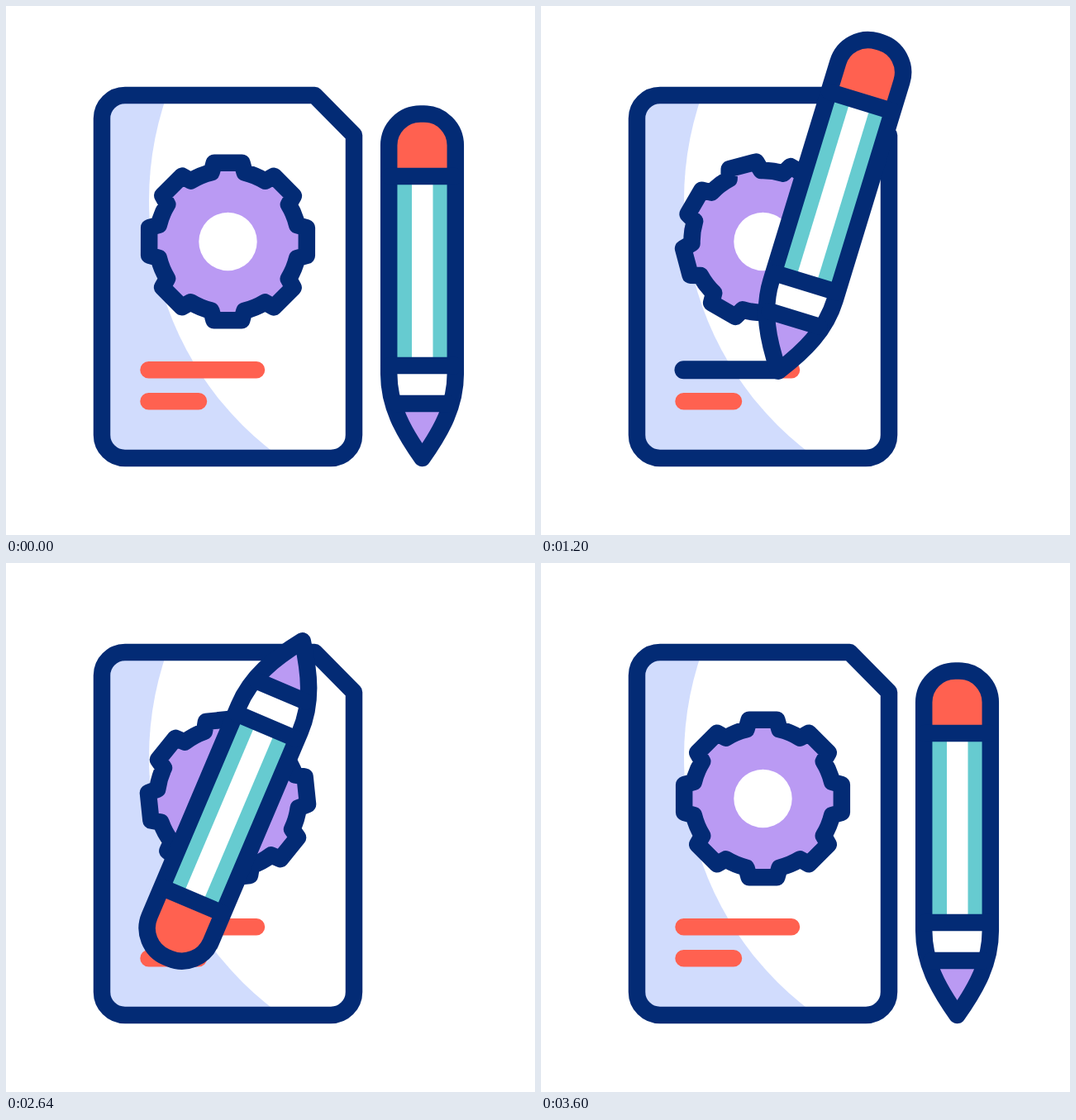
These frames come from a looping animation (640 px wide and 640 px high, 3620 ms). An HTML page:

```html
<!DOCTYPE html>
<html lang="en">
<head>
<meta charset="utf-8">
<title>Document and pencil</title>
<style>
  html, body { margin: 0; width: 100%; height: 100%; overflow: hidden; background: #fff; }
  svg { display: block; width: 100vw; height: 100vh; }
  .line { fill: none; stroke: #032b75; stroke-width: 20.5; stroke-linecap: round; stroke-linejoin: round; }
  .red { stroke: #ff6150; }
</style>
</head>
<body>
<svg viewBox="0 0 640 640">
  <defs>
    <path id="sheet" d="M144 108H373.400L421 156.300V519a28 28 0 0 1-28 28H144a28 28 0 0 1-28-28V136a28 28 0 0 1 28-28Z"/>
    <path id="body" d="M463.200 168.500a38 38 0 0 1 38-38h4.600a38 38 0 0 1 38 38V445C543.800 483 527 514 503.500 547C480 514 463.200 483 463.200 445Z"/>
    <path id="gear"/>
    <clipPath id="sheetClip"><use href="#sheet"/></clipPath>
    <clipPath id="bodyClip"><use href="#body"/></clipPath>
  </defs>

  <g clip-path="url(#sheetClip)">
    <rect x="106" y="98" width="326" height="460" fill="#d1dcfd"/>
    <circle cx="557" cy="235" r="384" fill="#fff"/>
  </g>
  <use href="#sheet" class="line"/>

  <g transform="translate(268.500 285)">
    <use href="#gear" fill="#ba9af3"/>
    <circle r="35.200" fill="#fff"/>
    <use href="#gear" class="line" id="rim"/>
  </g>

  <path class="line red" d="M172.500 440.300H303M172.500 478.300H233"/>
  <path class="line" id="ink" style="stroke-width:22"/>

  <g id="pencil">
    <g clip-path="url(#bodyClip)">
      <rect x="453" y="120" width="101" height="440" fill="#fff"/>
      <rect x="453" y="120" width="101" height="86" fill="#ff6150"/>
      <rect x="453" y="206" width="101" height="229" fill="#66cbd0"/>
      <rect x="491" y="206" width="25.500" height="229" fill="#fff"/>
      <rect x="453" y="481" width="101" height="80" fill="#ba9af3"/>
    </g>
    <use href="#body" class="line"/>
    <path class="line" d="M464 206H543M464 435H543M472 481H535"/>
  </g>
</svg>
<script>
const LOOP = 3620;
const $ = id => document.getElementById(id);

// Eight teeth, each with two outer corners and two feet
const polar = (r, deg) => {
  const a = deg * Math.PI / 180;
  return `${(r * Math.sin(a)).toFixed(2)} ${(-r * Math.cos(a)).toFixed(2)}`;
};
let gear = '';
for (let a = 0; a < 360; a += 45) {
  gear += `${a ? 'A86 86 0 0 1 ' : 'M'}${polar(86, a - 13.5)}` +
    `L${polar(96.8, a - 10)} ${polar(96.8, a + 10)} ${polar(86, a + 13.5)}`;
}
$('gear').setAttribute('d', gear + `A86 86 0 0 1 ${polar(86, -13.5)}Z`);

// Pencil poses: pivot position and tilt
const rest = { x: 503.5, y: 436, a: 0 };
const drawStart = { x: 204.5, y: 335.5, a: 17 };
const drawEnd = { x: 336, y: 335.5, a: 17 };
const eraseStart = { x: 409.5, y: 196.5, a: -157 };
const eraseEnd = { x: 277, y: 196.5, a: -157 };

const moves = [
  { start: 0, end: 632, from: rest, to: drawStart, via: { x: 268, y: 491 } },
  { start: 780, end: 1320, from: drawStart, to: drawEnd },
  { start: 1490, end: 2020, from: drawEnd, to: eraseStart },
  { start: 2280, end: 2840, from: eraseStart, to: eraseEnd },
  { start: 2975, end: 3600, from: eraseEnd, to: rest, via: { x: 424, y: 237 } }
];

const mix = (a, b, u) => a + (b - a) * u;
const curve = (a, c, b, u) => mix(mix(a, c, u), mix(c, b, u), u);

function poseAt(t) {
  const { start, end, from, to, via } = moves.findLast(m => t >= m.start);
  const k = Math.min(1, (t - start) / (end - start));
  const u = k * k * (3 - 2 * k);
  const along = axis => via ? curve(from[axis], via[axis], to[axis], u) : mix(from[axis], to[axis], u);
  return { x: along('x'), y: along('y'), a: mix(from.a, to.a, u) };
}

function inkEnd(t, x) {
  if (t < 780 || t > 2840) return 0;
  if (t < 1490) return Math.min(303, x - 32.5);
  return t < 2020 ? 303 : Math.min(303, x - 105);
}

function frame() {
  const t = Math.min(performance.now() % LOOP, 3600);
  const { x, y, a } = poseAt(t);
  $('pencil').setAttribute('transform', `translate(${x} ${y}) rotate(${a}) translate(${-rest.x} ${-rest.y})`);
  $('rim').setAttribute('transform', `rotate(${t / 10})`);
  const end = inkEnd(t, x);
  $('ink').setAttribute('d', end > 172.5 ? `M172.5 440.3H${end}` : '');
  requestAnimationFrame(frame);
}
frame();
</script>
</body>
</html>
```
